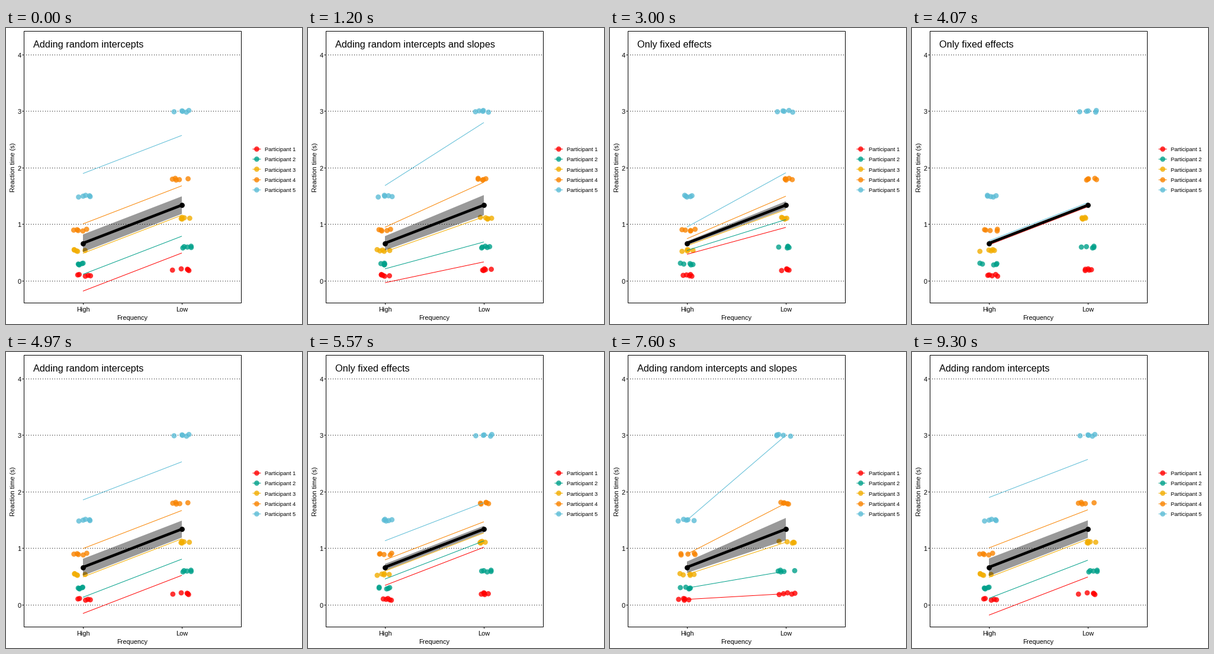
These frames come from a looping animation (500x500 px, 10 s). A matplotlib script:

```python
import numpy as np
import matplotlib.pyplot as plt
from matplotlib.animation import FuncAnimation
from matplotlib.patches import Polygon, Rectangle

FRAMES, LOOP_MS = 300, 10000
PX = 0.72  # points per pixel at 100 dpi
COLORS = ["#FF0000", "#00A08A", "#F2AD00", "#F98400", "#5BBCD6"]
TITLES = ["Adding random intercepts",
          "Adding random intercepts and slopes",
          "Only fixed effects"]
INTERCEPTS, SLOPES, FIXED = range(3)
X = np.array([130, 297])  # High, Low
TRIALS = 5

# Mean reaction time of each participant (High, Low) and overall
means = np.array([[.10, .20], [.30, .60], [.54, 1.11], [.90, 1.80], [1.50, 3]])
fixed = means.mean(axis=0)

# Trials scatter slightly around the mean; every state jitters them anew
rng = np.random.default_rng(7)
times = means[..., None] + 0.015 * np.linspace(-1, 1, TRIALS)
POINT_X = X[:, None] + rng.uniform(-16, 16, (3, len(means), 2, TRIALS))

# Predictions per state: participant lines and ribbon half-widths
deviation = 0.99 * (means - fixed).mean(axis=1, keepdims=True)
LINES = np.array([fixed + deviation, means, np.tile(fixed, (5, 1))])
RIBBON = np.array([[.155, .155], [.10, .197], [0, 0]])

# (first frame, last frame, from, to) of each transition
MOVES = [(20, 50, INTERCEPTS, SLOPES),
         (71, 100, SLOPES, FIXED),
         (121, 150, FIXED, INTERCEPTS)]


def to_y(value):
    return 427.4 - 95.55 * np.asarray(value)


def pose(frame):
    """Return the two states and the linear progress between them."""
    k = min(frame, FRAMES - 1 - frame)  # second half plays backwards
    state = INTERCEPTS
    for start, end, a, b in MOVES:
        if k <= start:
            break
        if k < end:
            return a, b, (k - start) / (end - start)
        state = b
    return state, state, 0.0


fig = plt.figure(figsize=(5, 5), dpi=100, facecolor="white")
ax = fig.add_axes([0, 0, 1, 1])
ax.set_xlim(0, 500)
ax.set_ylim(500, 0)
ax.axis("off")


def label(x, y, text, size=11, **kw):
    return ax.text(x, y, text, fontsize=size * PX, family="Liberation Sans",
                   color="black", va="baseline", **kw)


def stroke(x, y, color="black", width=1, **kw):
    return ax.plot(x, y, color=color, lw=width * PX,
                   solid_capstyle="butt", **kw)[0]


def dots(x, y, color, **kw):
    return ax.scatter(x, y, s=(8.8 * PX) ** 2, c=color, linewidths=0, **kw)


# Panel, grid and axes
for value in range(5):
    row = np.floor(to_y(value))
    stroke([30, 397], [row + 0.5] * 2, linestyle=(0, (1, 3)),
           dash_capstyle="butt", snap=False, zorder=1)
    stroke([27, 30], [row, row], zorder=1)
    label(25.5, row + 4.6, str(value), ha="right")
for x, name in zip(X, ["High", "Low"]):
    stroke([x, x], [464, 467], zorder=1)
    label(x, 479, name, ha="center")
ax.add_patch(Rectangle((30, 5), 367, 459, fill=False, ec="black", lw=PX,
                       zorder=8))
label(213, 493, "Frequency", ha="center")
label(15, 235.5, "Reaction time (s)", ha="center", rotation=90,
      rotation_mode="anchor")

# Legend
for i, color in enumerate(COLORS):
    y = 203.7 + 17.28 * i
    stroke([415.5, 429.5], [y, y], color, zorder=2)
    dots([422.5], [y], color, alpha=0.8, zorder=3)
    label(437, y + 4.3, f"Participant {i + 1}", size=9.35)

# Moving parts
title = label(46, 33, "", size=16.4)
point_y = to_y(times).ravel()
points = dots(np.zeros(point_y.size), point_y, np.repeat(COLORS, 2 * TRIALS),
              alpha=0.8, zorder=3)
lines = [stroke(X, X, color, zorder=4) for color in COLORS]
ribbon = Polygon(np.zeros((4, 2)), fc="black", alpha=0.4, lw=0, zorder=5)
ax.add_patch(ribbon)
stroke(X, to_y(fixed), width=4.6, zorder=6)
dots(X, to_y(fixed), "black", zorder=7)


def update(frame):
    a, b, t = pose(frame)

    def mix(values):
        return values[a] + (values[b] - values[a]) * t

    title.set_text(TITLES[b if t >= 0.5 else a])
    points.set_offsets(np.column_stack([mix(POINT_X).ravel(), point_y]))
    for line, ends in zip(lines, mix(LINES)):
        line.set_ydata(to_y(ends))
    half = mix(RIBBON)
    edge = np.concatenate([to_y(fixed + half), to_y(fixed - half)[::-1]])
    ribbon.set_xy(np.column_stack([np.concatenate([X, X[::-1]]), edge]))
    return [title, points, ribbon, *lines]


anim = FuncAnimation(fig, update, frames=FRAMES, interval=LOOP_MS / FRAMES,
                     init_func=lambda: update(0), repeat=True, repeat_delay=0)
plt.show()
```
